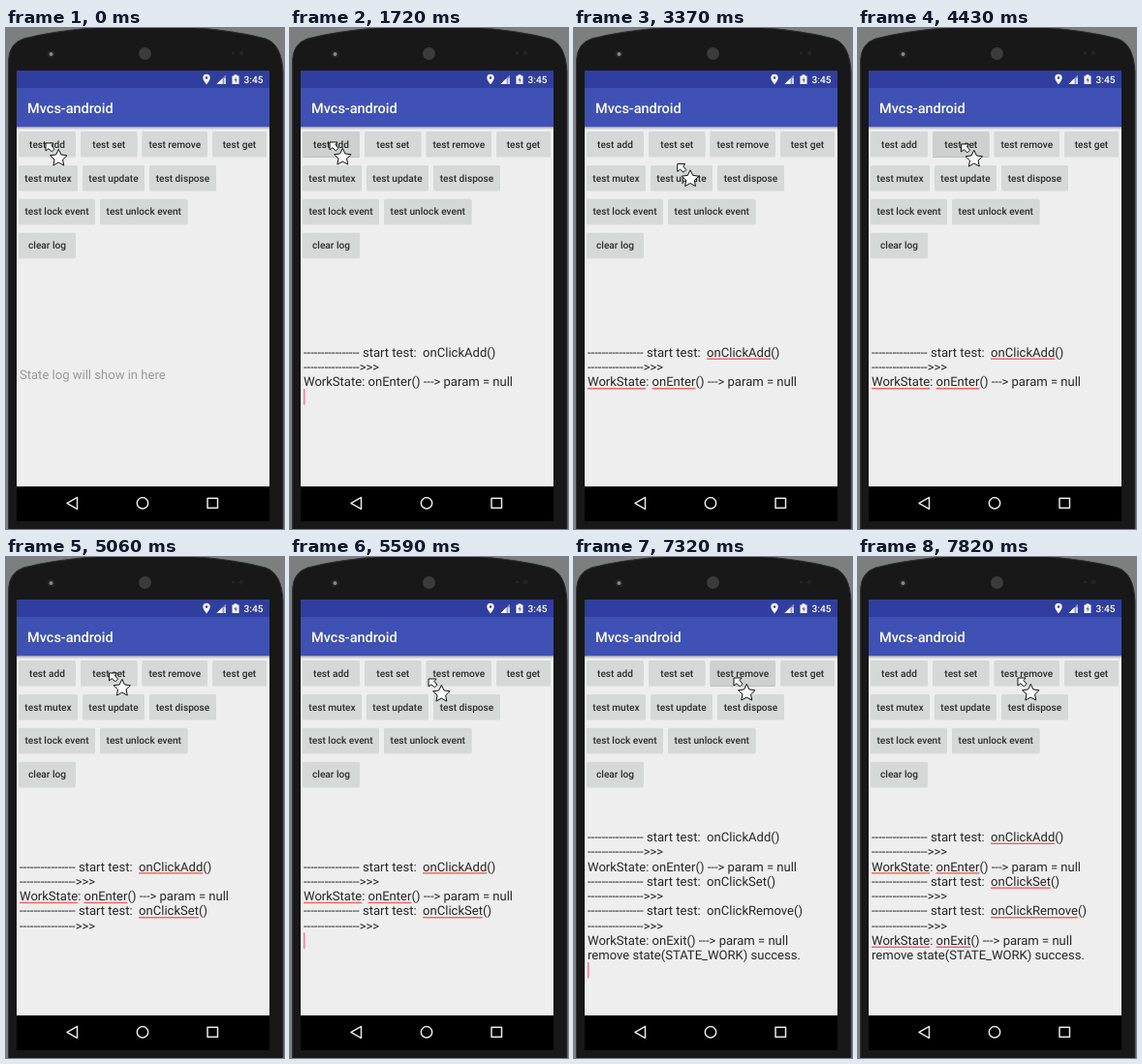
Write an HTML page that moves like this. It is 287x518 px and loops after 8000 ms.

```html
<!DOCTYPE html>
<html lang="en">
<head>
<meta charset="utf-8">
<title>Mvcs-android</title>
<style>
  html, body { margin: 0; width: 100%; height: 100%; overflow: hidden; background: #7d7f7e; }
  svg { display: block; width: 287px; height: 518px; }
  text { font-family: Roboto, sans-serif; white-space: pre; text-rendering: geometricPrecision; }
  .medium { font-weight: 500; font-size: 10.15px; }
  .log { font-size: 13.05px; fill: #262626; }
</style>
</head>
<body>
<svg id="stage" viewBox="0 0 287 518" xmlns="http://www.w3.org/2000/svg">
  <defs>
    <pattern id="mesh" width="2" height="2" patternUnits="userSpaceOnUse">
      <rect width="2" height="2" fill="#2b2b2b"/>
      <circle cx="1" cy="1" r=".65" fill="#5a5a5a"/>
    </pattern>
    <linearGradient id="shade" x2="0" y2="1">
      <stop offset="0" stop-color="#000" stop-opacity=".28"/>
      <stop offset="1" stop-color="#000" stop-opacity="0"/>
    </linearGradient>
  </defs>

  <!-- phone body -->
  <rect width="287" height="518" fill="#7d7f7e"/>
  <path d="M2.500 520V34Q3 16 18 11Q50 2.500 100 -1H187Q237 2.500 268 11Q285 17 286 46V520Z" fill="#181818" stroke="#303030"/>
  <circle cx="46.500" cy="27" r="4" fill="#222"/>
  <circle cx="46.500" cy="27" r="2" fill="#85858f"/>
  <circle cx="143.500" cy="26.500" r="6.500" fill="url(#mesh)"/>
  <circle cx="234.500" cy="26" r="1.500" fill="#292929"/>
  <circle cx="243" cy="26" r="2.500" fill="#232323"/>

  <!-- app screen -->
  <rect x="11" y="44" width="261" height="466" fill="#000"/>
  <rect x="11" y="102" width="261" height="372" fill="#eee"/>
  <rect x="11" y="44" width="261" height="18" fill="#303f9f"/>
  <rect x="11" y="62" width="261" height="40.200" fill="#3f51b5"/>
  <rect x="11" y="102.200" width="261" height="3" fill="url(#shade)"/>
  <text x="22" y="87.700" font-size="14.5" font-weight="500" fill="#fff">Mvcs-android</text>

  <!-- status icons -->
  <path d="M207 58.500C205 55.500 203.300 53.500 203.300 51.500A3.700 3.700 0 0 1 210.700 51.500C210.700 53.500 209 55.500 207 58.500Z" fill="#fff"/>
  <circle cx="207" cy="51.500" r="1.300" fill="#303f9f"/>
  <path d="M217.500 58L227 48.500V58Z" fill="#8a94cc"/>
  <path d="M217.500 58L223.500 52V58Z" fill="#fff"/>
  <path d="M226 52V58" stroke="#fff" stroke-width="1.200"/>
  <path d="M233.500 49.500H235.500V48.300H238.500V49.500H240.500V58H233.500Z" fill="#fff"/>
  <path d="M237.800 50.500L235.200 54.300H236.800V57L239 53.300H237.500Z" fill="#5c68b4"/>
  <text class="medium" x="245.500" y="57" fill="#fff">3:45</text>

  <!-- navigation keys -->
  <g fill="none" stroke="#e8e8e8" stroke-width="1.500" stroke-linejoin="round">
    <path d="M63 491.300L73.500 485.300V497.300Z"/>
    <circle cx="141" cy="491.300" r="5.700"/>
    <rect x="208" y="486.300" width="10.500" height="10"/>
  </g>

  <g id="buttons"></g>
  <g id="logs"></g>
  <rect id="caret" x="14" width="1.300" height="16.500" fill="#ff4081" opacity=".75"/>

  <g id="pointer" stroke="#111" stroke-linejoin="round" fill="#fff">
    <path d="M0 0H8L6 2.600L9 6.200L6.400 8.800L2.800 5.800L0 8Z"/>
    <path id="star"/>
  </g>
</svg>

<script>
const LOOP = 8000, LINE = 15.29, MIDDLE = 358.4, SPELL_DELAY = 100;
const $ = id => document.getElementById(id);

function add(parent, tag, attrs, content = '') {
  const el = document.createElementNS('http://www.w3.org/2000/svg', tag);
  for (const key in attrs) el.setAttribute(key, attrs[key]);
  el.textContent = content;
  parent.append(el);
  return el;
}

// label, left, right, row, press time
const buttons = [
  ['test add', 13, 72, 0, 1600], ['test set', 77, 135.5, 0, 4400],
  ['test remove', 140.5, 208, 0, 7270], ['test get', 213, 269, 0],
  ['test mutex', 13, 74, 1], ['test update', 79, 143, 1], ['test dispose', 148, 217, 1],
  ['test lock event', 13, 92, 2], ['test unlock event', 97, 187.5, 2],
  ['clear log', 13, 72, 3]
].map(([label, left, right, row, press]) => {
  const y = 107 + row * 34.9;
  const box = { x: left, y, width: right - left, height: 26, rx: 1.5 };
  const shadow = add($('buttons'), 'rect', { ...box, y: y + 1, fill: '#000', opacity: .06 });
  add($('buttons'), 'rect', { ...box, fill: '#d6d7d7' });
  const tint = add($('buttons'), 'rect', { ...box, fill: '#000', opacity: 0 });
  add($('buttons'), 'text', {
    class: 'medium', x: (left + right) / 2, y: y + 16.6, 'text-anchor': 'middle', fill: '#2b2b2b'
  }, label);
  return { press, shadow, tint };
});

const dashes = '-'.repeat(16);
const title = name => [`${dashes} start test:  onClick${name}()`, dashes + '>>>'];
const state = name => `WorkState: on${name}() ---> param = null`;
const afterAdd = [...title('Add'), state('Enter'), ''];
const afterSet = [...afterAdd.slice(0, 3), ...title('Set'), ''];
const afterRemove = [...afterSet.slice(0, 5), ...title('Remove'), state('Exit'),
  'remove state(STATE_WORK) success.', ''];

const logs = [
  [0, ['State log will show in here']],
  [1680, afterAdd], [4550, afterSet], [7320, afterRemove]
].map(([start, lines]) => {
  const group = add($('logs'), 'g', {});
  const marks = add(group, 'g', { fill: '#f4605c' });
  const top = MIDDLE - (lines.length - 1) / 2 * LINE;
  lines.forEach((line, i) => {
    const y = top + i * LINE;
    const text = add(group, 'text', { class: 'log', x: 14, y: y + 4.4 }, line);
    if (!start) text.style.fill = '#999';
    for (const word of line.matchAll(/WorkState|on[A-Z]\w+/g)) {
      const x = text.getStartPositionOfChar(word.index).x;
      const width = text.getSubStringLength(word.index, word[0].length);
      add(marks, 'rect', { x, y: y + 6, width, height: 1.4 });
    }
  });
  return { start, group, marks, caretY: top + (lines.length - 1) * LINE - 8.2 };
});

const blinks = [310, 790, 1290, 2180, 2650, 3160, 3660, 4190, 4550,
  5060, 5560, 6020, 6540, 6990, 7320, 7820];

// time, x, y of the pointer tip
const path = [
  [0, 41, 119], [119, 41, 119], [120, 41, 118], [2180, 41, 118],
  [2650, 107, 161], [2770, 107, 161], [3080, 107, 161], [3660, 106.5, 120],
  [5240, 106.5, 120], [5590, 143, 126], [6020, 171, 130],
  [6560, 171, 130], [6980, 165, 125], [LOOP, 165, 125]
];

$('star').setAttribute('d', 'M' + Array.from({ length: 10 }, (_, i) => {
  const a = i * Math.PI / 5, r = i % 2 ? 4.5 : 9.2;
  return [13.3 + r * Math.sin(a), 15.6 - r * Math.cos(a)].map(v => v.toFixed(2)).join(' ');
}).join('L') + 'Z');

function pointerAt(t) {
  const i = path.findIndex(p => p[0] > t);
  const [t0, x0, y0] = path[i - 1], [t1, x1, y1] = path[i];
  const k = (t - t0) / (t1 - t0);
  return [x0 + (x1 - x0) * k, y0 + (y1 - y0) * k];
}

const clamp = v => Math.max(0, Math.min(1, v));

function draw(t) {
  for (const { press, shadow, tint } of buttons) {
    if (!press) continue;
    const age = t - press;
    const k = age < 0 ? 0 : clamp(age / 30) * clamp((420 - age) / 250);
    tint.setAttribute('opacity', .035 * k);
    shadow.setAttribute('opacity', .06 + .14 * k);
  }
  const current = logs.filter(log => log.start <= t).pop();
  for (const log of logs) log.group.style.display = log === current ? '' : 'none';
  current.marks.style.display = t >= current.start + SPELL_DELAY ? '' : 'none';

  $('caret').setAttribute('y', current.caretY);
  $('caret').style.display = blinks.filter(b => b <= t).length % 2 ? '' : 'none';
  $('pointer').setAttribute('transform', `translate(${pointerAt(t)})`);
}

const origin = performance.now();
function tick() {
  draw((performance.now() - origin) % LOOP);
  requestAnimationFrame(tick);
}
tick();
</script>
</body>
</html>
```
